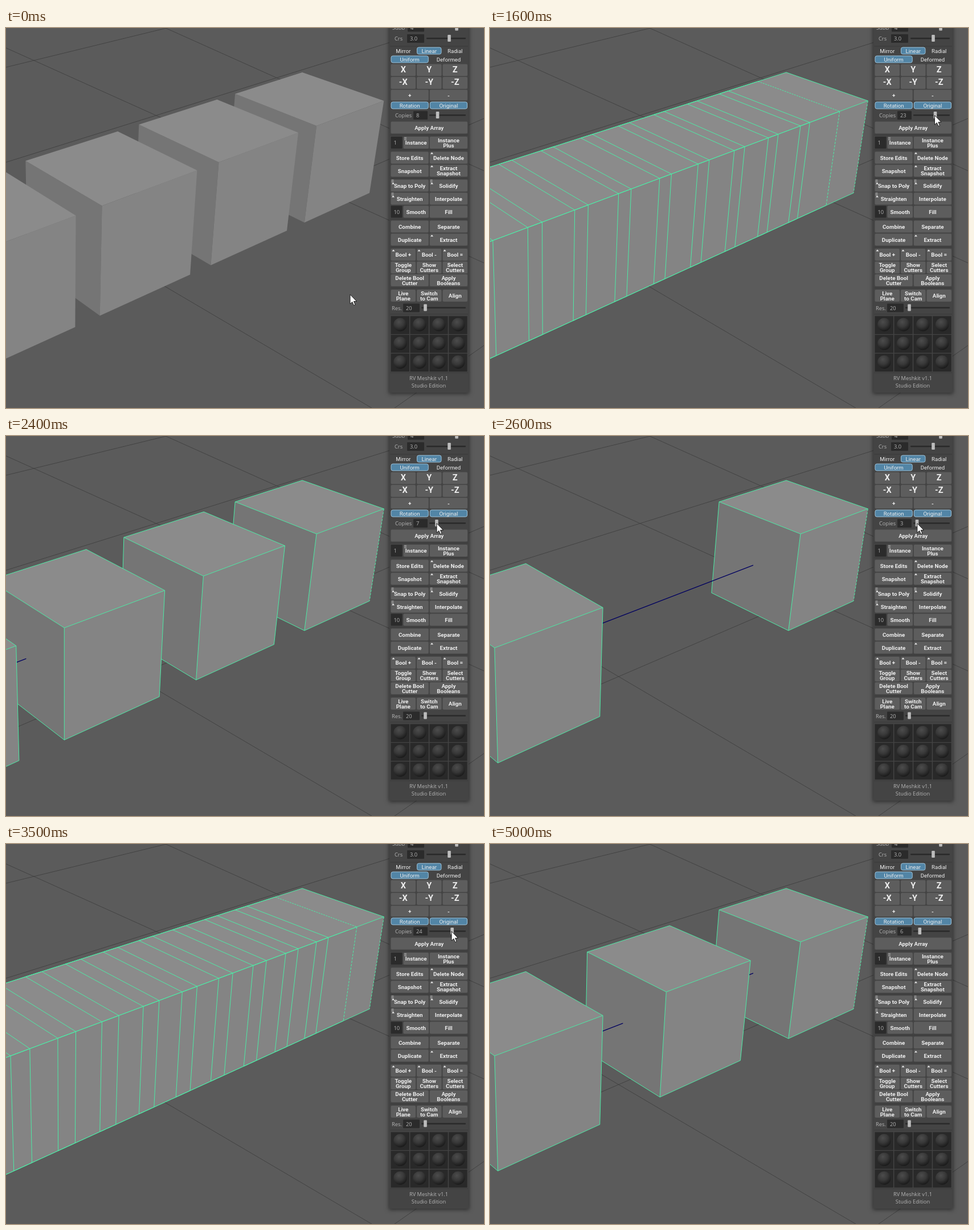
An HTML page with a canvas that plays this animation: 839x668 px, repeating every 5.3 s.

```html
<!DOCTYPE html>
<html lang="en">
<head>
<meta charset="utf-8">
<title>Linear array</title>
<style>
  html, body { margin: 0; width: 100%; height: 100%; overflow: hidden; background: #5b5b5b; }
  canvas, svg { position: absolute; left: 0; top: 0; }
  #panel { position: absolute; left: 673px; top: -20px; width: 139px; height: 661px;
    background: #444; box-shadow: 0 1px 7px 1px rgba(0, 0, 0, .5); }
  text { font: 700 9.8px Roboto, sans-serif; fill: #eee; text-anchor: middle; }
  .big { font-size: 14.5px; }
  .tab { font-weight: 400; font-size: 9.6px; }
  .label, .field { font: 400 9.3px "Open Sans", "Noto Sans", sans-serif; fill: #b4b4b4; text-anchor: start; }
  .foot { font: 400 9.3px "Open Sans", "Noto Sans", sans-serif; fill: #b4b4b4; }
</style>
</head>
<body>
<canvas id="scene" width="839" height="668"></canvas>
<div id="panel"></div>
<svg id="ui" width="839" height="668">
  <defs>
    <radialGradient id="ball" cx=".4" cy=".3" r=".75">
      <stop offset="0" stop-color="#4c4c4c"/>
      <stop offset=".5" stop-color="#383838"/>
      <stop offset="1" stop-color="#161616"/>
    </radialGradient>
  </defs>
  <g id="controls"></g>
  <path id="cursor" d="M0 0V16.5L3.8 13L6.5 19L9 18L6.4 12H11.5Z" fill="#fff" stroke="#111" stroke-width=".9"/>
</svg>
<script>
const $ = id => document.getElementById(id);
const controls = $('controls');

function add(tag, attrs, content) {
  const node = document.createElementNS('http://www.w3.org/2000/svg', tag);
  for (const key in attrs) node.setAttribute(key, attrs[key]);
  if (content !== undefined) node.textContent = content;
  controls.append(node);
  return node;
}

// ---- Panel ----
const LEFT = 675.5, WIDTH = 134.5, GAP = 2;

function box(x, y, w, h, fill, rx = 2, stroke = 'none') {
  return add('rect', { x, y, width: w, height: h, rx, fill, stroke });
}

function caption(x, y, label, cls = '') {
  const lines = label.split('|');
  lines.forEach((line, i) =>
    add('text', { x, y: y + 3.5 + (i - (lines.length - 1) / 2) * 9, class: cls }, line));
}

function button(x, y, w, h, label, cls) {
  box(x, y - h / 2, w, h, '#5d5d5d');
  caption(x + w / 2, y, label, cls);
}

// Calls draw(x, width, label) for equal columns.
function columns(labels, draw) {
  const w = (WIDTH - GAP * (labels.length - 1)) / labels.length;
  labels.forEach((label, i) => draw(LEFT + i * (w + GAP), w, label));
}

function row(y, labels, h = 21, cls = '') {
  columns(labels, (x, w, label) => button(x, y, w, h, label, cls));
}

function tabs(y, labels, active) {
  columns(labels, (x, w, label) => {
    if (active.includes(label)) box(x + .5, y - 6, w - 1, 12, '#5285a6', 3, '#9cc0d6');
    caption(x + w / 2, y, label, 'tab');
  });
}

function field(x, y, w, value, h = 15) {
  box(x, y - h / 2, w, h, '#2b2b2b', 1);
  return add('text', { x: x + 5, y: y + 3.5, class: 'field' }, value);
}

function slider(x, y, at) {
  box(x, y - 1.5, 807 - x, 2.5, '#2a2a2a', 1);
  return box(at - 2.8, y - 6.5, 5.6, 12, '#bcbcbc', 1);
}

function label(x, y, text) {
  add('text', { x, y: y + 3.5, class: 'label' }, text);
}

function mark(x, y) {
  add('path', { d: `M${x - 2.5} ${y + 1.5}l2.5 -3l2.5 3z`, fill: '#eee' });
}

function bars(x, y) {
  add('path', { d: `M${x} ${y}h4m-4 2h4m-4 2h4`, stroke: '#bbb', 'stroke-width': .8, fill: 'none' });
}

for (const y of [32, 188, 214, 264, 336, 385, 457, 503, 606]) box(674, y - .5, 137, 1, '#393939', 0);

label(678, -1, 'Subb');
field(705, -1, 29, '4');
slider(738, -1, 791);
label(682, 18.5, 'Crs');
field(704, 18.5, 30, '3.0');
slider(738, 18.5, 778);

tabs(40, ['Mirror', 'Linear', 'Radial'], ['Linear']);
tabs(55, ['Uniform', 'Deformed'], ['Uniform']);
row(74, ['X', 'Y', 'Z'], 21, 'big');
row(96.5, ['-X', '-Y', '-Z'], 21, 'big');
row(118, ['+', '-'], 19);
tabs(136, ['Rotation', 'Original'], ['Rotation', 'Original']);

label(683, 153.5, 'Copies');
const copiesText = field(715, 153.5, 25, '8');
const copiesHandle = slider(743, 153.5, 757.5);

row(175, ['Apply Array']);
field(LEFT, 201.5, 20, '1', 21);
button(697.5, 201.5, 44.5, 21, 'Instance');
button(743.8, 201.5, 66.2, 21, 'Instance|Plus');
row(228, ['Store Edits', 'Delete Node']);
row(251, ['Snapshot', 'Extract|Snapshot']);
row(277, ['Snap to Poly', 'Solidify']);
row(300, ['Straighten', 'Interpolate']);
field(LEFT, 323, 20, '10', 21);
button(697.5, 323, 44.5, 21, 'Smooth');
button(743.8, 323, 66.2, 21, 'Fill');
row(349, ['Combine', 'Separate']);
row(372, ['Duplicate', 'Extract']);
row(398.5, ['Bool +', 'Bool -', 'Bool =']);
row(421, ['Toggle|Group', 'Show|Cutters', 'Select|Cutters']);
row(443.5, ['Delete Bool|Cutter', 'Apply|Booleans']);
row(470.5, ['Live|Plane', 'Switch|to Cam', 'Align']);

label(677, 492, 'Res.');
field(697, 492, 29, '20');
slider(729, 492, 736);

for (const y of [220, 243, 365]) mark(747.5, y);
for (const x of [680, 725, 770]) mark(x, 391);
for (const [x, y] of [[679.5, 273], [679.5, 296], [747.5, 273]]) {
  mark(x, y);
  bars(x - 3, y - 6);
}
bars(699, 192.5);

for (let i = 0; i < 12; i++) {
  const x = LEFT + (i % 4) * 33.9, y = 506.5 + Math.floor(i / 4) * 32.9;
  box(x, y, 32.4, 31.6, '#292929', 0);
  add('circle', { cx: x + 16.4, cy: y + 15, r: 11.7, fill: 'url(#ball)' });
}
caption(742, 615.5, 'RV Meshkit v1.1', 'foot');
caption(742, 628, 'Studio Edition', 'foot');

// ---- Viewport ----
const ctx = $('scene').getContext('2d');
const GREEN = '#4deba6';
const VANISH = [2473, -547];
const SIZE = .1; // cube length as a share of the whole array

// Homogeneous far corners; the array slides them away from the vanishing point.
const corner = (x, y, rate) => [x / rate, y / rate, 1 / rate];
const TOP_BACK = corner(520, 78, .569);
const TOP_RIGHT = corner(663.3, 128, .6135);
const LOW_RIGHT = corner(638, 290, .5858);
const LOW_BACK = TOP_BACK.map((v, i) => v + LOW_RIGHT[i] - TOP_RIGHT[i]);
const CENTER = TOP_BACK.map((v, i) => (v + LOW_RIGHT[i]) / 2);

function project([x, y, w], t) {
  const depth = w - t;
  return [(x - VANISH[0] * t) / depth, (y - VANISH[1] * t) / depth];
}

function trace(points) {
  ctx.beginPath();
  points.forEach(p => ctx.lineTo(...p));
}

function fill(color, ...points) {
  trace(points);
  ctx.closePath();
  ctx.fillStyle = color;
  ctx.fill();
}

function line(color, points, dash = []) {
  trace(points);
  ctx.setLineDash(dash);
  ctx.strokeStyle = color;
  ctx.stroke();
}

const GRID = [
  [0, 69, 282, 0], [0, 35, 839, 413], [280, 0, 839, 251], [0, 236, 755, 0],
  [0, 520, 839, 159], [0, 290, 642, 668], [682, 668, 839, 558]
];

function drawScene(copies, selected) {
  ctx.fillStyle = '#5b5b5b';
  ctx.fillRect(0, 0, 839, 668);
  ctx.lineWidth = .9;
  for (const [a, b, c, d] of GRID) line('#404040', [[a, b], [c, d]]);

  const cubes = [];
  for (let k = 0; k < copies && k / copies < .7; k++) {
    const t = k / copies, near = t + SIZE;
    cubes.push({
      a: project(TOP_BACK, t), b: project(TOP_RIGHT, t), e: project(LOW_RIGHT, t),
      d: project(TOP_BACK, near), c: project(TOP_RIGHT, near),
      f: project(LOW_RIGHT, near), g: project(LOW_BACK, near),
      axis: [project(CENTER, near), project(CENTER, t + 1 / copies)]
    });
  }

  ctx.lineWidth = 1;
  for (const { a, b, c, d, e, f, g, axis } of cubes) {
    fill('#757575', d, c, f, g);
    if (selected) {
      line(GREEN, [d, g, f]);
      if (1 / copies > SIZE) {
        ctx.lineWidth = 1.3;
        line('#000060', axis);
        ctx.lineWidth = 1;
      }
    }
    fill('#8b8b8b', a, b, c, d);
    fill('#848484', b, c, f, e);
  }
  if (!selected) return;

  // Top and right faces are coplanar across cubes, so their edges all stay visible.
  const overlap = 1 / copies < SIZE;
  cubes.forEach(({ a, b, c, d, e, f }, k) => {
    const faint = overlap && k === 1;
    line(GREEN, [a, d, c, f, e]);
    line(GREEN, [c, b]);
    line(GREEN, [a, b], faint ? [3, 1.5] : []);
    line(GREEN, [b, e], faint || k === 0 ? [4, 2] : []);
  });
}

// ---- Timeline, in steps of 100 ms ----
const DRAG_START = 12;
const DRAG = [10, 12, 16, 20, 23, 25, 25, 24, 21, 16, 12, 9, 7, 4, 3, 3, 4,
  7, 10, 13, 17, 21, 23, 24, 24, 23, 21, 18, 14, 11, 9, 7, 6];

function copiesAt(step) {
  return step < DRAG_START ? 8 : DRAG[Math.min(step - DRAG_START, DRAG.length - 1)];
}

function glide(from, to, u) {
  u = Math.min(Math.max(u, 0), 1);
  return from.map((v, i) => v + (to[i] - v) * u);
}

const smooth = u => u * u * (3 - 2 * u);

function cursorAt(step) {
  if (step < 7) return glide([604, 468.5], [583, 221], smooth(Math.min(step / 5, 1)));
  if (step < DRAG_START) return glide([583, 221], [763.5, 158], smooth(Math.min((step - 5.6) / 4.4, 1)));
  const drag = [745.3 + 1.53 * copiesAt(step), 153.5];
  return step < 46 ? drag : glide(drag, [217.5, 647], (step - 45) / 4);
}

let shown = -1;
function frame() {
  const step = Math.floor(performance.now() % 5300 / 100);
  if (step !== shown) {
    shown = step;
    const copies = copiesAt(step);
    const [x, y] = cursorAt(step);
    drawScene(copies, step >= 6);
    copiesText.textContent = copies;
    copiesHandle.setAttribute('x', 741.9 + 1.6 * copies);
    $('cursor').setAttribute('transform', `translate(${x} ${y})`);
    $('cursor').style.display = step < 50 ? '' : 'none';
  }
  requestAnimationFrame(frame);
}
frame();
</script>
</body>
</html>
```
